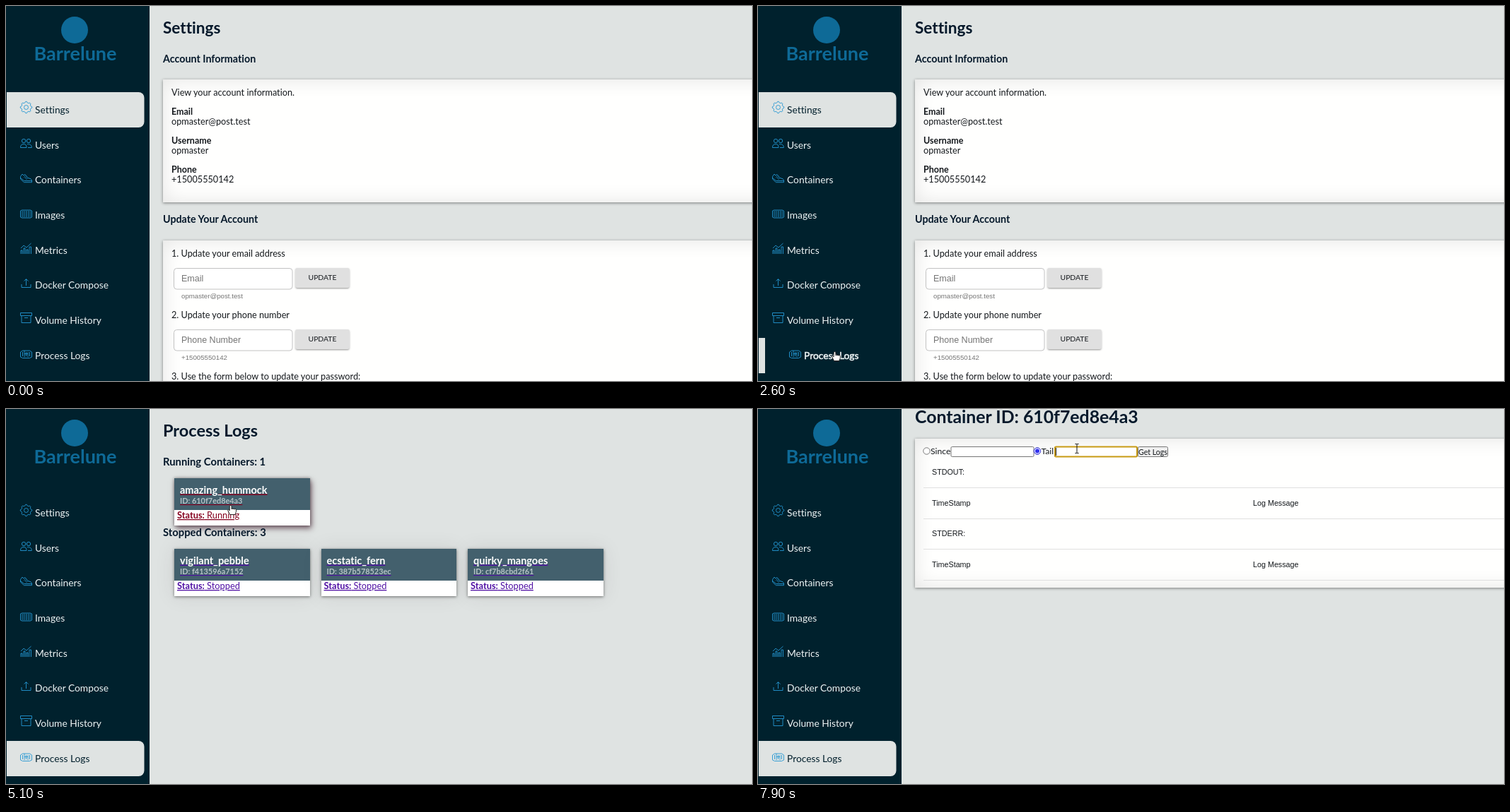
Write an HTML page that moves like this. It is 1055 px wide and 531 px high and loops after 8000 ms.

```html
<!DOCTYPE html>
<html lang="en">
<head>
<meta charset="utf-8">
<title>Container dashboard</title>
<style>
  html, body { margin: 0; width: 100%; height: 100%; overflow: hidden; background: #dfe3e2; }
  #stage { position: absolute; left: 0; top: 0; width: 1055px; height: 531px; overflow: hidden; }
  section, svg, .panel, .card, .button { position: absolute; }
  section, svg { left: 0; top: 0; width: 1055px; height: 531px; }
  text { font-family: Lato, sans-serif; font-variant-ligatures: none; fill: #14181c; white-space: pre; }
  .title { fill: #06192b; font-weight: 700; }
  .bold { font-weight: 700; }
  .plain { font-family: "Liberation Sans", Arial, sans-serif; }
  .faint { fill: #757575; }
  .panel { background: #fffffe; box-shadow: inset 0 0 28px rgba(0,0,0,.11), 0 1px 4px rgba(0,0,0,.45); }
  .card { background: linear-gradient(#43606d 45px, #fff 45px);
          box-shadow: 0 1px 4px rgba(0,0,0,.5), 0 0 28px rgba(60,50,60,.1); }
  .card.hover { box-shadow: 2px 4px 8px rgba(60,25,40,.65), 0 0 4px rgba(0,0,0,.4); }
  .button { background: #e0e0e0; border-radius: 3px;
            box-shadow: 0 2px 2px -1px rgba(0,0,0,.25), 0 1px 3px rgba(0,0,0,.2); }
  .link { fill: #4f0fa3; text-decoration: underline; }
  .pressed .link { fill: #85001f; }
  .link .name { fill: #fff; }
  .link .id { fill: #b7c2c7; }
  .row text { fill: #eef3f4; }
  .row.active text { fill: #03202d; }
  .row.hover text { stroke: #eef3f4; stroke-width: .55px; }
  .row.active.hover text { stroke: #03202d; }
  .icon { fill: none; stroke: #2497d3; stroke-width: .9px; }
  .field { fill: #fff; stroke: #767676; }
</style>
</head>
<body>
<div id="stage"></div>
<script>
const text = (x, y, size, str, cls = '') =>
  `<text x="${x}" y="${y}" font-size="${size}" class="${cls}">${str}</text>`;
const box = (cls, x, y, w, h) =>
  `<div class="${cls}" style="left:${x}px;top:${y}px;width:${w}px;height:${h}px"></div>`;
const rect = (x, y, w, h, rx, attrs) =>
  `<rect x="${x}" y="${y}" width="${w}" height="${h}" rx="${rx}" ${attrs}/>`;
const screen = (id, boxes, art) => `<section id="${id}">${boxes}<svg>${art}</svg></section>`;

// Account settings
const email = 'opmaster@post.test', phone = '+15005550142';
const account = [['Email', email], ['Username', 'opmaster'], ['Phone', phone]];
const updateForm = (y, label, hint, current) =>
  text(234, y + 24, 12.7, label) +
  rect(237.5, y + 40.5, 167.5, 29.5, 4, 'fill="#fff" stroke="#c2c2c2"') +
  text(248, y + 59, 12.5, hint, 'plain faint') +
  text(248, y + 83, 9.7, current, 'plain faint') +
  `<text x="447.5" y="${y + 57}" font-size="10.4" text-anchor="middle">UPDATE</text>`;

const settings = screen('settings',
  box('panel', 222, 104, 900, 174) + box('panel', 222, 332, 900, 260) +
  box('button', 409, 371, 77, 28) + box('button', 409, 458, 77, 28),
  text(222, 39, 22.6, 'Settings', 'title') +
  text(222, 80, 14.3, 'Account Information', 'title') +
  text(234, 127, 12.7, 'View your account information.') +
  account.map(([label, value], i) =>
    text(234, 154 + i * 41.2, 12.5, label, 'bold') +
    text(234, 168 + i * 41.2, 12.7, value)).join('') +
  text(222, 307, 14.3, 'Update Your Account', 'title') +
  updateForm(331, '1. Update your email address', 'Email', email) +
  updateForm(418, '2. Update your phone number', 'Phone Number', phone) +
  text(234, 529, 12.7, '3. Use the form below to update your password:'));

// Container list
const containers = [
  [238, 98, 'amazing_hummock', '610f7ed8e4a3', 'Running'],
  [238, 198, 'vigilant_pebble', 'f413596a7152', 'Stopped'],
  [445.5, 198, 'ecstatic_fern', '387b578523ec', 'Stopped'],
  [653, 198, 'quirky_mangoes', 'cf7b8cbd2f61', 'Stopped'],
];
const cardText = ([x, y, name, id, status]) =>
  text(x + 8, y + 21.5, 14.5, `<tspan class="name">${name}</tspan>`, 'link bold') +
  text(x + 8, y + 36, 10.9, `<tspan class="id">ID: ${id}</tspan>`, 'link bold') +
  text(x + 4, y + 57, 12.8, `<tspan class="bold">Status:</tspan> ${status}`, 'link');
const processes = screen('processes',
  containers.map(([x, y]) => box('card', x, y, 191.5, 67)).join(''),
  text(222, 39, 23.5, 'Process Logs', 'title') +
  text(222, 80, 14.8, 'Running Containers: 1', 'title') +
  text(222, 180, 14.8, 'Stopped Containers: 3', 'title') +
  `<g id="idle">${cardText(containers[0])}</g>` +
  `<g id="pressed" class="pressed">${cardText(containers[0])}</g>` +
  containers.slice(1).map(cardText).join(''));

// Log viewer
const logs = screen('logs', box('panel', 222, 41.5, 900, 211.5),
  text(222, 20, 24.8, 'Container ID: 610f7ed8e4a3', 'title') +
  '<circle cx="238.5" cy="59.5" r="4.7" class="field"/>' +
  text(244, 64, 12.2, 'Since') + rect(273, 53.5, 117, 14, 1.5, 'class="field"') +
  '<circle cx="395" cy="59.5" r="4.7" class="field"/>' +
  '<g id="checked"><circle cx="395" cy="59.5" r="4.6" fill="#fff" stroke="#3232ee"/>' +
  '<circle cx="395" cy="59.5" r="3" fill="#3232ee"/></g>' +
  text(400.5, 64, 12.2, 'Tail') + rect(419.5, 53.5, 117, 14, 1.5, 'class="field"') +
  '<g id="focus">' + rect(420, 53.5, 116, 14, 1.5, 'fill="#fff" stroke="#c79a14" stroke-width="2"') +
  '<path d="M421.5 55v11" stroke="#222"/></g>' +
  rect(537.5, 53.5, 42, 14, 2, 'fill="#efefef" stroke="#767676"') +
  text(538, 64.5, 10.6, 'Get Logs') +
  ['STDOUT:', 'TimeStamp', 'STDERR:', 'TimeStamp'].map((label, i) => {
    const y = 93 + i * 43.6;
    return text(246, y, 10.75, label, 'plain') +
      (i % 2 ? text(700, y, 10.75, 'Log Message', 'plain') : '') +
      `<path d="M234 ${Math.round(y + 18) + .5}H1055" stroke="#e0e0e0"/>`;
  }).join(''));

// Sidebar
const gear = 'M' + Array.from({ length: 32 }, (_, i) => {
  const angle = (i - .5) * Math.PI / 16, r = i % 4 < 2 ? 8.2 : 6.7;
  return [8.5 + r * Math.cos(angle), 8.5 + r * Math.sin(angle)].map(v => v.toFixed(1));
}).join('L') + 'zM11.5 8.5a3 3 0 1 0-6 0a3 3 0 1 0 6 0z';
const menu = [
  ['Settings', gear],
  ['Users', 'M7.8 6a2.7 2.7 0 1 0-5.4 0a2.7 2.7 0 1 0 5.4 0zM14.7 6a2.7 2.7 0 1 0-5.4 0a2.7 2.7 0 1 0 5.4 0z' +
    'M.5 15.5c0-3.5 1.5-5 4.5-5s4 1.5 4 5zM10 10.8c4-.8 6.3 1 6.3 4.7H11'],
  ['Containers', 'M.5 7.5L3 4l2 2 2-1.5 4 5 4 1.2 1.5 2v3H5.5L.5 11zM.5 9.5l5 4h11M5.5 8.5l2-1.5M7 10l2-1.5M8.5 11.5l2-1.5'],
  ['Images', 'M.5 6l2-1h12l2 1v9l-2 1h-12l-2-1zM3 6v9M5.7 6v9M8.5 6v9M11.3 6v9M14 6v9'],
  ['Metrics', 'M1 17v-5h2v5M5 17V9h2v8M9 17v-6h2v6M13 17V7h2.5v10M1 9l4-4 4 3 6.5-6'],
  ['Docker Compose', 'M2 11v4.5h13V11M8.5 13V4M5.5 6.5l3-3 3 3'],
  ['Volume History', 'M.5 1.5h16v4h-16zM2 5.5v10h13v-10M6 8.5h5'],
  ['Process Logs', 'M.5 7l3-2h10l3 2v7l-3 1.5h-10l-3-1.5zM3.5 7v6M6 5v9M8.5 7v6M11 7v7M13.5 7v6M6 9.5h5'],
];
const sidebar = '<svg>' + rect(0, 0, 203, 531, 0, 'fill="#00212d"') +
  '<circle cx="97" cy="34" r="19" fill="#0e6a97"/>' +
  '<text x="98" y="77" font-size="27" class="bold" text-anchor="middle" style="fill:#0e6a97">Barrelune</text>' +
  menu.map(([label, icon], i) => `<g class="row" transform="translate(0 ${Math.round(i * 49.65)})">` +
    '<path class="tab" d="M1 122h186.5a8 8 0 0 1 8 8v34a8 8 0 0 1-8 8H1z" fill="#dfe3e2"/>' +
    rect(1, 122, 9, 50, 0, 'class="bar" fill="#dfe3e2"') +
    `<g class="label"><path class="icon" transform="translate(20 135)" d="${icon}"/>` +
    text(41, 152, 13.8, label) + '</g></g>').join('') + '</svg>';

const pointer = '<svg><g id="pointer" stroke="#fff">' +
  '<path data-kind="arrow" d="M0 0v12l2.8-2.4 1.9 4.1 2-.9-1.8-4h3.6z" fill="#111" stroke-width=".7"/>' +
  '<path data-kind="hand" transform="translate(-4 -3)" fill="#fff" stroke="#111" stroke-width=".9" d="M4.5.5' +
  'c-.8 0-1.4.6-1.4 1.3v6L1.7 6.6C1 6 .2 6.6.5 7.4l3 6.1h7.3l1.5-4V6.6c0-1.5-2-1.4-2.2-.4' +
  ' 0-1.2-2-1.2-2.1-.3 0-1.1-1.9-1.1-2.1-.2V1.8C5.9 1 5.2.5 4.5.5z"/>' +
  '<path data-kind="beam" d="M-2.5-6.5h2l.5.5.5-.5h2M0-6V6M-2.5 6.5h2L0 6l.5.5h2" fill="none" stroke="#111"/>' +
  '</g></svg>';

const stage = document.getElementById('stage');
stage.innerHTML = settings + processes + logs + sidebar + pointer;

// Pointer path: time, x, y
const path = [
  [500, 150, 14], [700, 142, 165], [900, 134, 325], [1000, 131, 345], [1300, 131, 345],
  [1500, 133, 384], [1700, 129, 416], [1900, 126, 455], [2100, 124, 488], [2300, 124, 488],
  [2600, 108, 492], [3100, 108, 492], [3300, 142, 440], [3600, 287.5, 282.5],
  [3800, 306, 215], [4000, 314, 160], [4300, 317.5, 139], [5400, 317, 139], [6000, 317, 139],
  [6300, 352, 92], [6500, 385, 63], [6600, 396, 59], [7500, 396, 59], [7700, 451, 56],
];
// Row i is hovered from rowTimes[i] until rowTimes[i + 1]
const rowTimes = [650, 710, 770, 830, 900, 1370, 1590, 1950, 3250];
const SLIDE = 24, SLIDE_MS = 240;

const clamp = v => Math.max(0, Math.min(1, v));
const all = selector => [...stage.querySelectorAll(selector)];
const show = (el, on) => { el.style.display = on ? '' : 'none'; };
const byId = id => document.getElementById(id);
const rows = all('.row'), cards = all('.card'), pointers = all('[data-kind]');

function pointerAt(t) {
  const next = path.findIndex(p => p[0] > t);
  if (next < 0) return path[path.length - 1].slice(1);
  if (next === 0) return path[0].slice(1);
  const [t0, x0, y0] = path[next - 1], [t1, x1, y1] = path[next];
  const k = (t - t0) / (t1 - t0);
  return [x0 + (x1 - x0) * k, y0 + (y1 - y0) * k];
}

function pointerKind(t) {
  if (t < 700) return 'arrow';
  if (t < 5400) return 'hand';
  return t === 6500 || t >= 7600 ? 'beam' : 'arrow';
}

function draw(t) {
  show(byId('settings'), t < 2800);
  show(byId('processes'), t >= 2800 && t < 5400);
  show(byId('logs'), t >= 5400);
  show(byId('idle'), t < 5100);
  show(byId('pressed'), t >= 5100);
  show(byId('checked'), t >= 7300);
  show(byId('focus'), t >= 7900);

  rows.forEach((row, i) => {
    const start = rowTimes[i], end = rowTimes[i + 1];
    const hover = t >= start && t < end;
    const active = i === (t < 2800 ? 0 : 7);
    const reached = clamp((Math.min(t, end) - start) / SLIDE_MS);
    const shift = SLIDE * clamp(reached - Math.max(0, t - end) / SLIDE_MS);
    row.classList.toggle('hover', hover);
    row.classList.toggle('active', active);
    show(row.querySelector('.tab'), active);
    show(row.querySelector('.bar'), hover);
    row.querySelector('.label').setAttribute('transform', `translate(${shift} 0)`);
  });

  cards[0].classList.toggle('hover', t >= 4000);
  cards[1].classList.toggle('hover', t >= 3700 && t < 3900);

  const kind = pointerKind(t);
  show(byId('pointer'), t >= 500);
  byId('pointer').setAttribute('transform', `translate(${pointerAt(t)})`);
  pointers.forEach(p => show(p, p.dataset.kind === kind));
}

// Ten pictures a second, like a screen recording
const begin = performance.now();
function tick() {
  draw(Math.floor((performance.now() - begin) % 8000 / 100) * 100);
  requestAnimationFrame(tick);
}
tick();
</script>
</body>
</html>
```
